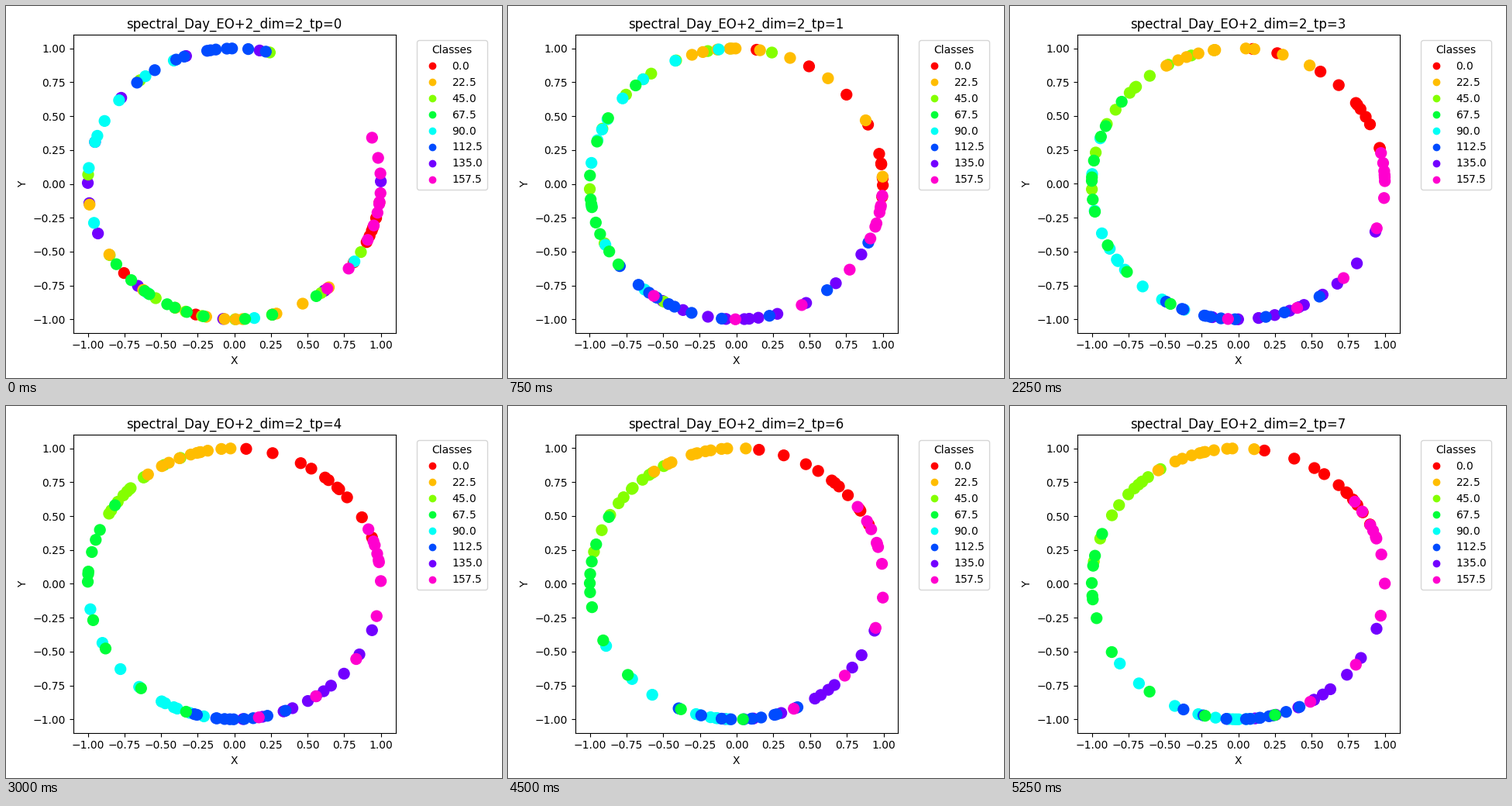
Animation, 640 px wide and 480 px high, one loop 6 s. Source, as a matplotlib script:

```python
import numpy as np
import matplotlib.pyplot as plt
from matplotlib.animation import FuncAnimation

DAYS = 8
STEP_MS = 750
CLASS_WIDTH = 22.5
DOTS = 11      # dots per class
CROWDING = 1.6  # above 1 packs dots towards the middle of their arc
JITTER = 1.5   # degrees

KEY_DAYS = [0, 1, 4, 7]

# Arc of each class on the key days: (low, middle, high) in degrees.
ARCS = {
    0: [(221, 334, 353), (-6, 8, 82), (21, 50, 85), (26, 44, 79)],
    6: [(80, 189, 359), (239, 275, 329), (271, 303, 341), (265, 303, 341)],
    2: [(77, 252, 330), (74, 130, 241), (111, 137, 151), (124, 136, 172)],
    1: [(188, 265, 309), (0, 90, 109), (90, 106, 127), (85, 104, 123)],
    4: [(114, 160, 327), (97, 155, 230), (192, 241, 258), (214, 266, 275)],
    5: [(77, 100, 132), (219, 245, 335), (253, 267, 290), (247, 278, 295)],
    3: [(214, 245, 305), (133, 189, 217), (146, 175, 252), (157, 188, 285)],
    7: [(308, 352, 378), (238, 344, 355), (280, 368, 384), (300, 379, 398)],
}


def arc_angles(keys, day):
    """Angles of one class: dense at the middle, sparse towards both ends."""
    low, mid, high = (np.interp(day, KEY_DAYS, k) for k in zip(*keys))
    t = np.linspace(-1, 1, DOTS)
    return mid + np.abs(t) ** CROWDING * np.where(t < 0, low - mid, high - mid)


fig, ax = plt.subplots(figsize=(6.4, 4.8), dpi=100)


def draw(day):
    ax.clear()
    rng = np.random.default_rng(day)
    angles = np.concatenate([arc_angles(keys, day) for keys in ARCS.values()])
    angles = np.radians(angles + rng.normal(0, JITTER, angles.size))
    classes = np.repeat(list(ARCS), DOTS) * CLASS_WIDTH
    dots = ax.scatter(np.cos(angles), np.sin(angles), c=classes, s=100,
                      cmap="hsv", vmin=0, vmax=180)
    ax.set_title(f"spectral_Day_EO+2_dim=2_tp={day}")
    ax.set_xlabel("X")
    ax.set_ylabel("Y")
    ax.legend(*dots.legend_elements(), title="Classes",
              bbox_to_anchor=(1.05, 1), loc="upper left")


draw(0)
fig.tight_layout()
anim = FuncAnimation(fig, draw, frames=DAYS, interval=STEP_MS,
                     repeat=True, repeat_delay=0)
plt.show()
```
